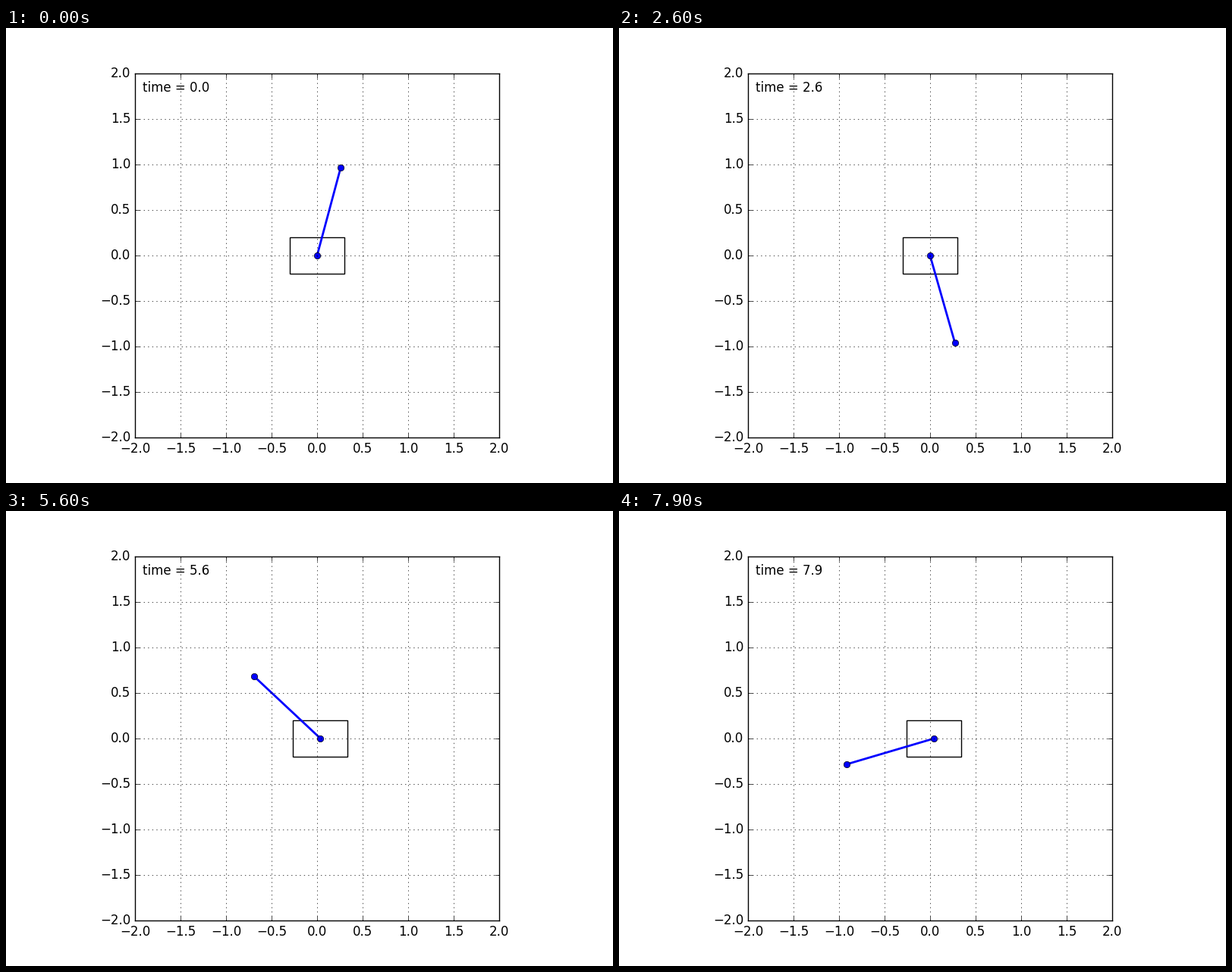
These frames come from a looping animation (800 by 600 pixels, 8 s). A matplotlib script:

```python
import numpy as np
import matplotlib.pyplot as plt
from matplotlib.animation import FuncAnimation
from matplotlib.patches import Rectangle

plt.style.use("classic")
plt.rcParams["font.family"] = "DejaVu Sans"

FRAMES, DT, SUBSTEPS = 80, 0.1, 20
G = 9.8
ARM = 0.6364        # effective pendulum length
RECOIL = 0.036      # share of the swing taken up by the cart
START = np.radians(15)
LEAD = 0.0147       # time already elapsed at the first picture
CART_W, CART_H = 0.6, 0.4


def deriv(state):
    th, om = state
    s, c = np.sin(th), np.cos(th)
    return np.array([om, s * (G - RECOIL * om**2 * c) / (ARM - RECOIL * c**2)])


def advance(state, span, n):
    h = span / n
    for _ in range(n):
        k1 = deriv(state)
        k2 = deriv(state + h / 2 * k1)
        k3 = deriv(state + h / 2 * k2)
        k4 = deriv(state + h * k3)
        state = state + h / 6 * (k1 + 2 * k2 + 2 * k3 + k4)
    return state


def simulate():
    state = advance(np.array([START, 0.0]), LEAD, 4)
    angles = []
    for _ in range(FRAMES):
        angles.append(state[0])
        state = advance(state, DT, SUBSTEPS)
    return np.array(angles)


def cart_shift(s):
    return 0.041 * s - 0.008 * s**3


theta = simulate()
cart_x = cart_shift(np.sin(START)) - cart_shift(np.sin(theta))
tip_x = cart_x + np.sin(theta)
tip_y = np.cos(theta)

fig = plt.figure(figsize=(8, 6), dpi=100, facecolor="w")
ax = fig.add_subplot(111, aspect="equal", xlim=(-2, 2), ylim=(-2, 2))
ticks = np.arange(-2, 2.1, 0.5)
ax.set_xticks(ticks)
ax.set_yticks(ticks)
ax.grid(True)

cart = ax.add_patch(Rectangle((-CART_W / 2, -CART_H / 2), CART_W, CART_H,
                              fc="none", ec="k", lw=1))
rod, = ax.plot([], [], "o-", color="b", lw=2, ms=6, mec="k", mew=0.5)
clock = ax.text(0.02, 0.95, "", transform=ax.transAxes)


def draw(i):
    cart.set_x(cart_x[i] - CART_W / 2)
    rod.set_data([cart_x[i], tip_x[i]], [0, tip_y[i]])
    clock.set_text(f"time = {i * DT:.1f}")
    return cart, rod, clock


anim = FuncAnimation(fig, draw, frames=FRAMES, interval=100,
                     repeat=True, repeat_delay=0, blit=False)
plt.show()
```
